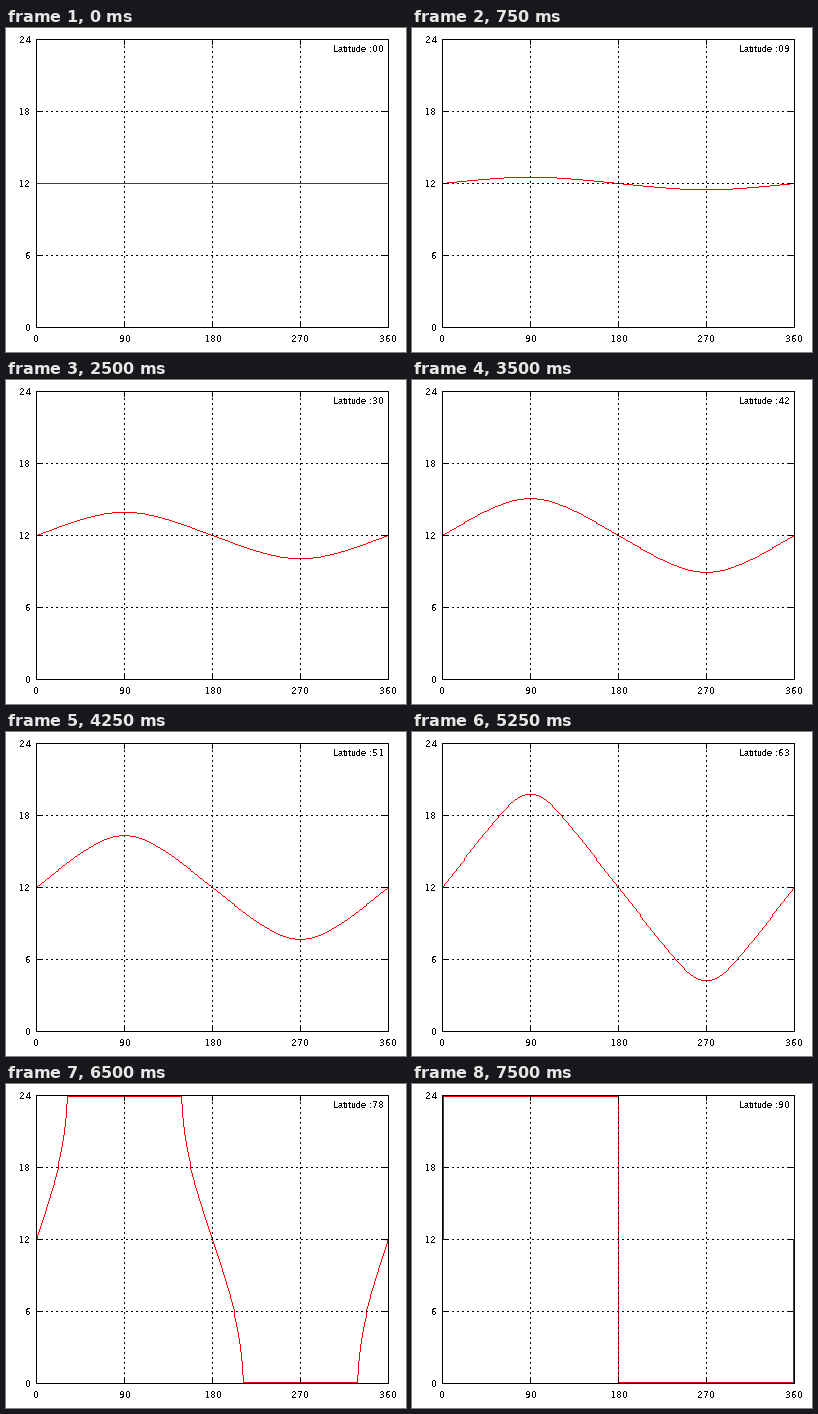
Animation, 400 px wide and 324 px high, one loop 8000 ms. Source, as a matplotlib script:

```python
import numpy as np
import matplotlib.pyplot as plt
from matplotlib.animation import FuncAnimation

W, H = 400, 324
LEFT, RIGHT, TOP, BOTTOM = 30, 382, 11, 299
MID = (TOP + BOTTOM) // 2
CENTER = (LEFT + RIGHT) // 2
TILT = np.radians(23.44)
STEP_MS, FRAMES, MAX_LAT = 250, 32, 90
BLACK, DARK, RED = (0, 0, 0), (64, 64, 64), (255, 0, 0)

plt.rcParams.update({"text.antialiased": False, "text.hinting": "native",
                     "text.hinting_factor": 1, "toolbar": "None"})

fig = plt.figure(figsize=(W / 72, H / 72), dpi=72, facecolor="white")
ax = fig.add_axes([0, 0, 1, 1])
canvas = np.full((H, W, 3), 255, np.uint8)
picture = ax.imshow(canvas, extent=(0, W, H, 0), aspect="auto",
                    interpolation="nearest")
ax.set(xlim=(0, W), ylim=(H, 0))
ax.axis("off")


def stroke(xs, ys, color=BLACK, on=1, period=1):
    """Crisp one-pixel polyline, dotted when period exceeds on."""
    xs, ys = np.rint(xs).astype(int), np.rint(ys).astype(int)
    for x0, y0, x1, y1 in zip(xs, ys, xs[1:], ys[1:]):
        n = max(abs(x1 - x0), abs(y1 - y0))
        i = np.arange(n + 1)
        i = i[i % period < on]
        t = i / max(n, 1)
        cols = np.rint(x0 + t * (x1 - x0)).astype(int)
        rows = np.rint(y0 + t * (y1 - y0)).astype(int)
        canvas[rows, cols] = color


def label(x, y, text, ha="left", font="DejaVu Sans", size=9.4):
    return ax.text(x, y, text, ha=ha, va="baseline", family=font,
                   fontsize=size, color="black")


def day_length(lat, lon):
    """Hours of daylight for a latitude and solar longitude in degrees."""
    decl = np.arcsin(np.sin(TILT) * np.sin(np.radians(lon)))
    cos_hour = -np.tan(np.radians(lat)) * np.tan(decl)
    return 24 / np.pi * np.arccos(np.clip(cos_hour, -1, 1))


def draw_curve(lat):
    if lat == MAX_LAT:
        xs = [LEFT, CENTER, CENTER, RIGHT]
        ys = [TOP, TOP, BOTTOM, BOTTOM]
    else:
        lon = np.arange(361)
        xs = LEFT + lon * (RIGHT - LEFT) / 360
        ys = BOTTOM - 12 * day_length(lat, lon)
    stroke(np.clip(xs, LEFT + 1, RIGHT - 1),
           np.clip(ys, TOP + 1, BOTTOM - 1), RED)


def draw_grid():
    for i in (1, 2, 3):
        x, y = LEFT + 88 * i, BOTTOM - 72 * i
        stroke([x, x], [BOTTOM, TOP], on=2, period=5)
        stroke([LEFT, RIGHT], [y, y], on=2, period=5)
        for start, end in ((TOP, TOP + 5), (BOTTOM - 5, BOTTOM)):
            stroke([x, x], [start, end])
        for start, end in ((LEFT, LEFT + 5), (RIGHT - 5, RIGHT)):
            stroke([start, end], [y, y])
    stroke([LEFT, RIGHT, RIGHT, LEFT, LEFT], [TOP, TOP, BOTTOM, BOTTOM, TOP])


for i in range(5):
    label(LEFT + 88 * i + 0.5, 314, str(90 * i), "center")
    label(24.5, BOTTOM - 72 * i + 4, str(6 * i), "right")
label(327, 24, "Latitude :", font="Liberation Sans", size=9)
value = label(366, 24, "")


def draw(frame):
    lat = min(3 * frame, MAX_LAT)
    canvas[:] = 255
    if lat > 0:
        draw_curve(lat)
    draw_grid()
    if lat == 0:
        stroke([LEFT + 1, RIGHT - 1], [MID, MID], DARK)
    elif lat == MAX_LAT:
        stroke([LEFT + 1] * 2, [TOP + 1, MID], DARK)
        stroke([RIGHT - 1] * 2, [MID, BOTTOM - 1], DARK)
    picture.set_data(canvas)
    value.set_text(f"{lat:02d}")
    return picture, value


anim = FuncAnimation(fig, draw, frames=FRAMES, interval=STEP_MS,
                     repeat=True, repeat_delay=0, blit=False)
plt.show()
```
